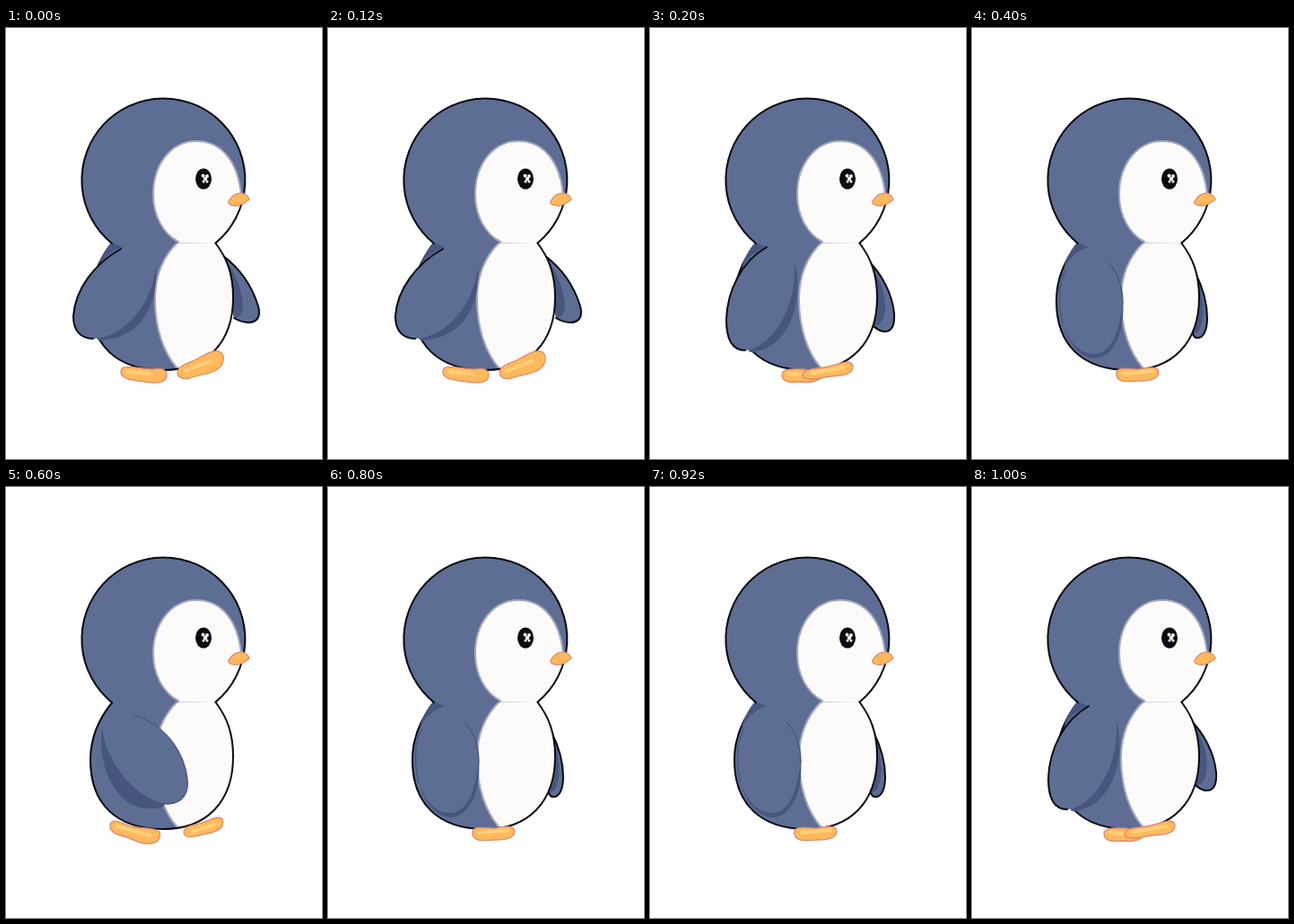
Write an HTML page that moves like this. It is 352x480 px and loops after 1.2 s.

```html
<!DOCTYPE html>
<html lang="en">
<head>
<meta charset="utf-8">
<title>Waddling penguin</title>
<style>
  html, body { margin: 0; width: 100%; height: 100%; overflow: hidden; background: #fff; }
  svg { display: block; width: 100vw; height: 100vh; }
  path, circle { stroke-linejoin: round; stroke-linecap: round; }
  .blue { fill: #5e6d94; }
  .shade { fill: #48567f; }
  .white { fill: #fdfbfa; }
  .ink { fill: none; stroke: #080a10; stroke-width: 2; }
  .rim { fill: none; stroke: #a5a9ba; stroke-width: 2; }
  .crease { fill: none; stroke: #48567f; stroke-width: 1.3; }
  .foot { fill: #ffb95d; stroke: #dc8c73; stroke-width: 1.3; }
  .glow { fill: none; stroke: #ffcf79; stroke-width: 4; }
</style>
</head>
<body>
<svg viewBox="0 0 352 480">
  <g id="back"></g>

  <path class="blue" d="M119 238C104 257 94 277 94 304C94 353 123 381 175 381C224 381 253 350 253 300C253 274 246 256 233 238Z"/>
  <path class="white" d="M192 237C174 255 166 276 166 302C166 335 176 362 190 379C230 376 253 346 253 300C253 274 246 256 233 237Z"/>
  <path class="rim" d="M192 238C174 255 166 276 166 302C166 335 176 362 190 378"/>
  <path class="ink" d="M119 239C104 257 94 277 94 304C94 353 123 381 175 381C224 381 253 350 253 300C253 274 246 256 233 239"/>

  <g id="front"></g>

  <path class="blue" d="M118 240A91 91 0 1 1 234 239Z"/>
  <path class="white" d="M192 239C175 229 164 209 164 185C164 152 184 126 212 126C242 126 260 152 263 197C257 214 247 229 233 239Z"/>
  <path class="rim" d="M192 238C175 229 164 209 164 185C164 152 184 126 212 126C241 126 259 150 262 187"/>
  <path class="ink" d="M118 240A91 91 0 1 1 234 239"/>
  <ellipse cx="220" cy="168" rx="9" ry="11.5" fill="#090b10"/>
  <g fill="#fff">
    <circle cx="219.5" cy="164.5" r="1.9"/>
    <circle cx="224" cy="165" r="1.9"/>
    <circle cx="222" cy="168" r="2.2"/>
    <circle cx="220" cy="171" r="1.5"/>
    <circle cx="224" cy="171" r="1.5"/>
  </g>
  <path class="foot" d="M248 193C251 187 257 183 264 184C268 186 271 188 271 191C267 194 262 198 256 198C251 198 247 196 248 193Z"/>
</svg>
<script>
const path = (cls, d) => `<path class="${cls}" d="${d}"/>`;
const foot = (d, glow) => path("foot", d) + path("glow", glow);
const shoulder = path("shade", "M117 239L130 244C119 247 111 254 102 267C105 256 110 247 117 239Z");

const farArm = (outer, shade) =>
  path("blue", outer) + path("shade", shade) + path("ink", outer);

// Arm swung clear of the body: ink on the outside, shade on the inside.
const swungArm = (outer, inner, shade) =>
  path("shade", shade) + path("blue", outer + inner) + shoulder + path("ink", outer);

const level = "M161 383C163 377 176 380 186 380C196 378 207 376 208 383C208 390 199 393 187 393C174 394 159 396 161 383Z";

const poses = [
  {
    back: farArm("M241 253C261 268 274 287 281 310C284 321 280 328 270 328C264 328 259 326 254 323",
                 "M243 256C255 271 262 290 264 308C264 317 260 323 254 323Z"),
    front: swungArm("M128 246C98 263 77 291 75 321C75 338 84 346 97 346",
                    "C128 345 161 313 167 267L164 240Z",
                    "M167 265C170 310 150 346 103 348L97 340Z") +
      foot("M129 379C136 375 151 380 164 380C174 378 180 381 179 388C177 396 166 396 155 394C139 392 124 391 129 379Z", "M135 383L160 385") +
      foot("M191 384C191 376 202 374 210 370C222 364 228 359 237 360C243 362 244 370 239 377C232 385 220 385 211 388C201 392 192 392 191 384Z", "M199 382L227 371")
  },
  {
    back: farArm("M243 259C258 274 270 296 272 318C273 333 268 339 260 338C255 337 252 335 249 332",
                 "M246 264C259 283 264 303 261 319C259 328 255 332 249 332Z"),
    front: swungArm("M130 244C102 260 86 292 85 325C85 347 91 359 106 359",
                    "C133 357 164 314 161 262L158 240Z",
                    "M162 264C171 309 153 359 111 361L106 352Z") +
      foot("M147 386C148 378 160 380 171 380L194 384C191 393 180 396 168 394C157 395 147 395 147 386Z", "M154 385L169 386") +
      foot("M170 385C174 378 188 380 199 377C211 374 223 368 226 376C227 387 212 387 200 388C187 391 169 394 170 385Z", "M180 384L216 378")
  },
  {
    back: farArm("M249 273C257 289 262 307 262 323C262 338 257 346 250 345C248 345 247 343 246 341",
                 "M251 278C259 303 260 325 252 338L246 341Z"),
    front: path("blue", "M128 244C105 260 97 280 97 306C99 343 117 368 136 367C157 366 170 338 168 302C167 284 162 272 152 262Z") +
      path("shade", "M168 303C171 340 157 367 137 368C121 368 107 352 101 329C109 352 121 363 137 363C154 362 165 340 168 303Z") +
      path("crease", "M104 270C96 286 96 309 101 329M152 262C164 274 168 289 168 307") +
      shoulder + foot(level, "M169 385L201 382")
  },
  {
    back: "",
    front: path("shade", "M107 270C101 306 121 358 158 358C167 359 173 358 177 354L163 342Z") +
      path("blue", "M126 247C114 254 107 263 107 272C112 310 149 352 180 353C197 353 204 340 202 325C199 299 181 266 143 254Z") +
      path("crease", "M143 254C181 266 199 299 202 325C204 340 197 353 180 353C149 352 112 310 107 272") +
      foot("M116 376C118 368 129 374 139 378C150 381 163 378 171 384C174 394 166 398 154 397C145 396 140 391 131 389C122 387 115 383 116 376Z", "M124 378L161 388") +
      foot("M198 385C198 377 209 377 218 374C228 371 237 365 241 370C244 378 237 383 228 385C217 387 199 394 198 385Z", "M207 384L233 376")
  }
];

const order = [0, 1, 2, 3, 2, 1];
const back = document.getElementById("back");
const front = document.getElementById("front");
let shown = -1;

function draw(now) {
  const i = order[Math.floor(now / 200) % order.length];
  if (i !== shown) {
    back.innerHTML = poses[i].back;
    front.innerHTML = poses[i].front;
    shown = i;
  }
}

function tick() {
  draw(performance.now() - start);
  requestAnimationFrame(tick);
}

const start = performance.now();
tick();
</script>
</body>
</html>
```
